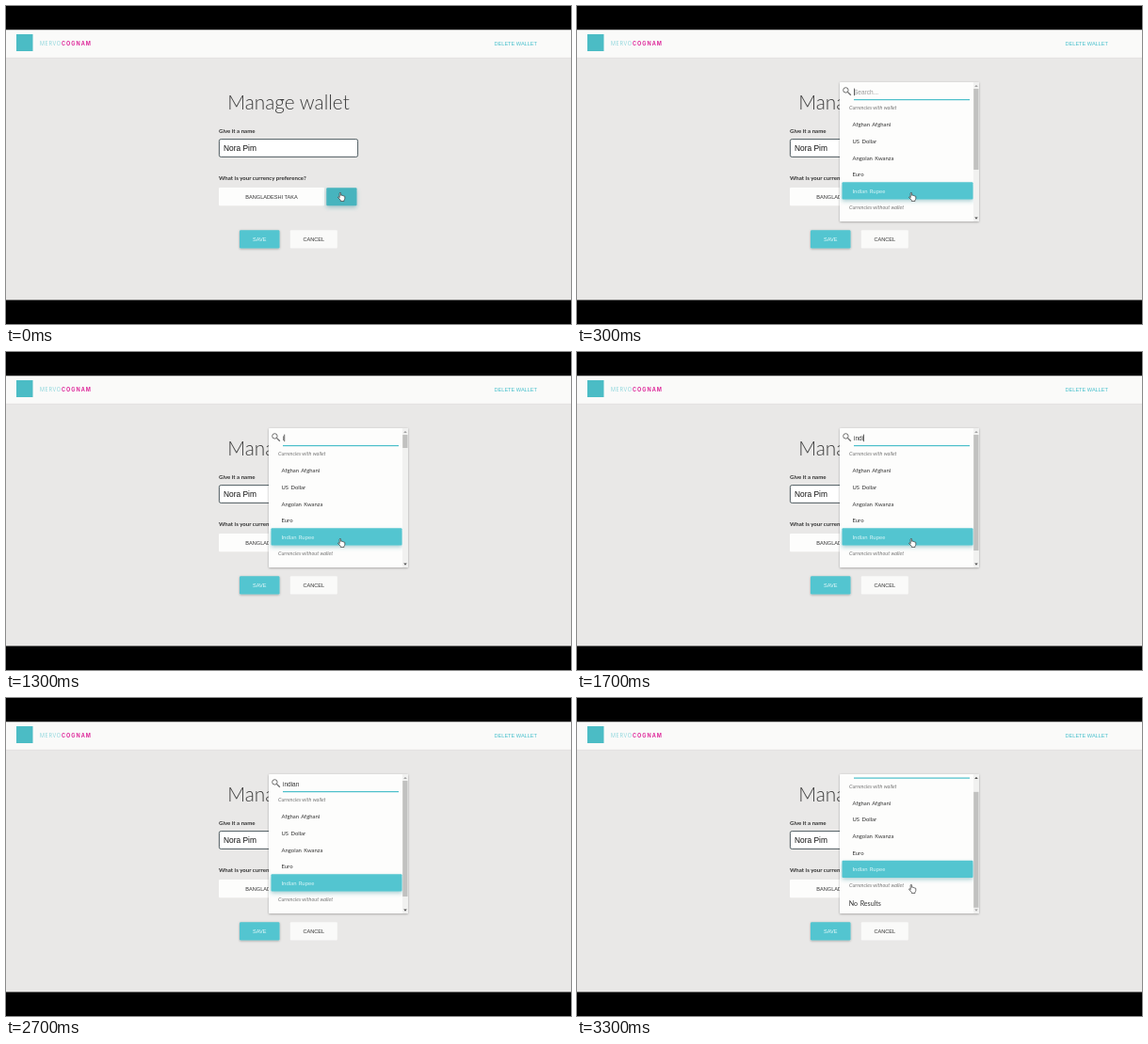
These frames come from a looping animation (600 px wide and 338 px high, 3.8 s). An HTML page:

```html
<!DOCTYPE html>
<html lang="en">
<head>
<meta charset="utf-8">
<title>Manage wallet</title>
<style>
  html, body { margin: 0; width: 100%; height: 100%; overflow: hidden; background: #000; }
  svg { display: block; width: 100vw; height: 100vh; }
  text { font-family: Lato, sans-serif; fill: #333; white-space: pre; }
  .ui { font-family: "Liberation Sans", Arial, sans-serif; font-size: 5.6px; }
  .mid { text-anchor: middle; }
  .brand { font-family: Inter, sans-serif; font-size: 5.5px; }
  .label { font-size: 6.1px; font-weight: 700; }
  .group { font-size: 5.5px; font-style: italic; fill: #777; }
  .row { font-size: 5.95px; word-spacing: .8px; }
  .field { font-size: 6.5px; }
</style>
</head>
<body>
<svg viewBox="0 0 600 338" xmlns="http://www.w3.org/2000/svg">
  <defs>
    <filter id="soft" x="-20%" y="-40%" width="140%" height="190%">
      <feDropShadow dx="0" dy=".7" stdDeviation=".9" flood-opacity=".32"/>
    </filter>
    <filter id="glow" x="-20%" y="-40%" width="140%" height="220%">
      <feDropShadow dx="0" dy="2" stdDeviation="2.2" flood-color="#2f8d98" flood-opacity=".4"/>
    </filter>
    <clipPath id="clip"><rect id="clipBox" x="279" y="81" width="148" height="148" rx="1"/></clipPath>
  </defs>

  <rect width="600" height="338"/>
  <rect y="25.5" width="600" height="287" fill="#e9e8e7"/>
  <rect y="54.5" width="600" height="1" fill="#dfdedd"/>
  <rect y="25.5" width="600" height="29.3" fill="#fafaf9"/>
  <rect x="11" y="30" width="17.5" height="18" fill="#4bbcc5"/>
  <text class="brand" x="36" y="42.4" style="fill:#6fcbd3;font-weight:300;letter-spacing:.65px">MERVO</text>
  <text class="brand" x="59" y="42.4" style="fill:#de2a9b;font-weight:700;letter-spacing:1px">COGNAM</text>
  <text class="ui" x="518.5" y="42.2" style="fill:#45bfcc">DELETE WALLET</text>

  <text class="mid" x="300" y="110.3" style="font-size:20.8px;font-weight:300;fill:#3c3c3c">Manage wallet</text>
  <text class="label" x="226" y="134.6">Give it a name</text>
  <rect x="226.4" y="141.6" width="147.2" height="18.8" rx="1.8" fill="#fff" stroke="#3e4c52" stroke-width=".9"/>
  <text class="ui" x="231" y="154" style="font-size:8.4px;fill:#111">Nora Pim</text>
  <text class="label" x="226" y="184.7">What is your currency preference?</text>
  <rect x="226" y="193" width="112" height="19.2" rx="1" fill="#fdfdfc"/>
  <text class="ui mid" x="282" y="204.6">BANGLADESHI TAKA</text>
  <rect x="340.3" y="193.2" width="32.2" height="19" rx="1" fill="#47b4be" filter="url(#glow)"/>
  <rect x="248" y="238.3" width="42.5" height="19.2" rx="1.2" fill="#53c5d0" filter="url(#soft)"/>
  <text class="ui mid" x="269.2" y="249.9" style="fill:#e9fafb">SAVE</text>
  <rect x="301.8" y="238.3" width="50" height="19.2" rx="1" fill="#fafaf9"/>
  <text class="ui mid" x="326.8" y="249.9">CANCEL</text>

  <g id="panel">
    <rect id="sheet" x="279" y="81" width="148" height="148" rx="1" fill="#fdfdfc" filter="url(#soft)"/>
    <g clip-path="url(#clip)">
      <g id="list">
        <g fill="none" stroke="#6b6b6b" stroke-width="1">
          <circle cx="285.4" cy="89.4" r="2.7"/>
          <path d="M287.4 91.4L290.8 94.8" stroke-width="1.3"/>
        </g>
        <text id="hint" class="ui field" x="294" y="93.9" style="fill:#999">Search...</text>
        <text id="query" class="ui field" x="294" y="93.9"></text>
        <rect id="caret" y="87.6" width=".7" height="7.6" fill="#222"/>
        <rect id="line" x="294" y="99" height="1.2"/>
        <rect id="focus" x="281.5" y="187.3" width="139" height="18.2" rx="1" fill="#53c5d0" filter="url(#glow)"/>
        <g id="rows"></g>
        <text class="group" x="289" y="110.4">Currencies with wallet</text>
        <text class="group" x="289" y="215.8">Currencies without wallet</text>
        <text id="none" x="288.7" y="235.2" style="font-size:7.1px;word-spacing:.8px">No Results</text>
      </g>
      <g id="bar">
        <rect x="421" y="81" width="6" height="148" fill="#f1f1f0"/>
        <rect id="thumb" x="421.2" width="5.3" fill="#c1c1c0"/>
        <path id="up" d="M422.2 86L424 83.8L425.8 86Z"/>
        <path id="down" d="M422.2 224.6L424 226.8L425.8 224.6Z"/>
      </g>
    </g>
  </g>

  <path id="hand" transform="translate(352 198)" fill="#fff" stroke="#333" stroke-width=".7" stroke-linejoin="round"
    d="M2.2 5.6V1.1Q2.2 .4 2.9 .4T3.6 1.1V3.3Q4.6 2.8 5 3.6Q6 3.1 6.4 3.9Q7.7 3.6 7.8 4.8V6.5Q7.7 7.7 7 8.4V9.4H3.3V8.5L.8 5.6Q.3 4.8 1 4.6Q1.6 4.6 2.2 5.6Z"/>
</svg>
<script>
const LOOP = 3800, STEP = 100;
const $ = id => document.getElementById(id);
const set = (id, attrs) => {
  for (const key in attrs) $(id).setAttribute(key, attrs[key]);
};
const show = (id, on) => set(id, { visibility: on ? "inherit" : "hidden" });

const currencies = ["Afghan Afghani", "US Dollar", "Angolan Kwanza", "Euro", "Indian Rupee"];
const rows = currencies.map((name, i) => {
  const row = document.createElementNS("http://www.w3.org/2000/svg", "text");
  row.setAttribute("class", "row");
  row.setAttribute("x", 292.5);
  row.setAttribute("y", 128.2 + i * 17.67);
  row.textContent = name;
  $("rows").append(row);
  return row;
});

const word = "indian";
const keys = [1300, 1400, 1500, 1700, 1800, 2000];
const thumbs = [[0, 86], [700, 14], [1400, 40], [1500, 60], [1700, 123]];
const advance = [0, 1.45, 5.05, 8.7, 10.1, 13.7, 17.35];

function render(now) {
  const t = Math.floor((now % LOOP) / STEP) * STEP;
  const k = Math.min(1, t / 300);
  const ease = 1 - (1 - k) ** 2;
  const open = k === 1;
  const scrolled = t >= 3000;
  const typed = keys.filter(at => t >= at).length;

  // The menu grows out of its lower left part.
  const sx = .55 + .45 * ease, sy = .5 + .5 * ease;
  show("panel", t > 0);
  set("panel", {
    opacity: 1 - (1 - k) ** 2.7,
    transform: `translate(279 214) scale(${sx} ${sy}) translate(-279 -214)`
  });
  const height = open ? 148 : 144.5;
  set("sheet", { height });
  set("clipBox", { height });
  set("list", { transform: `translate(0 ${scrolled ? -14.5 : 0})` });

  show("focus", open);
  rows[4].style.fill = open ? "#d9f4f6" : "";
  set("line", open ? { width: 123, height: 1.2, fill: "#4bbfca" }
                   : { width: 129, height: .7, fill: "#bbb" });

  show("hint", !typed);
  $("query").textContent = word.slice(0, typed);
  set("caret", { x: 294 + advance[typed] });
  show("caret", (open && t < 900) || (t >= 1300 && t < 2700));

  show("bar", open);
  const size = thumbs.filter(([at]) => t >= at).pop()[1];
  set("thumb", { y: scrolled ? 99.8 : 88, height: size });
  set("up", { fill: scrolled ? "#505050" : "#a3a3a3" });
  set("down", { fill: scrolled ? "#a3a3a3" : "#505050" });
  show("none", t >= 1700);
  show("hand", t < 2100 || scrolled);
}

const start = performance.now();
function tick() {
  render(performance.now() - start);
  requestAnimationFrame(tick);
}
tick();
</script>
</body>
</html>
```
